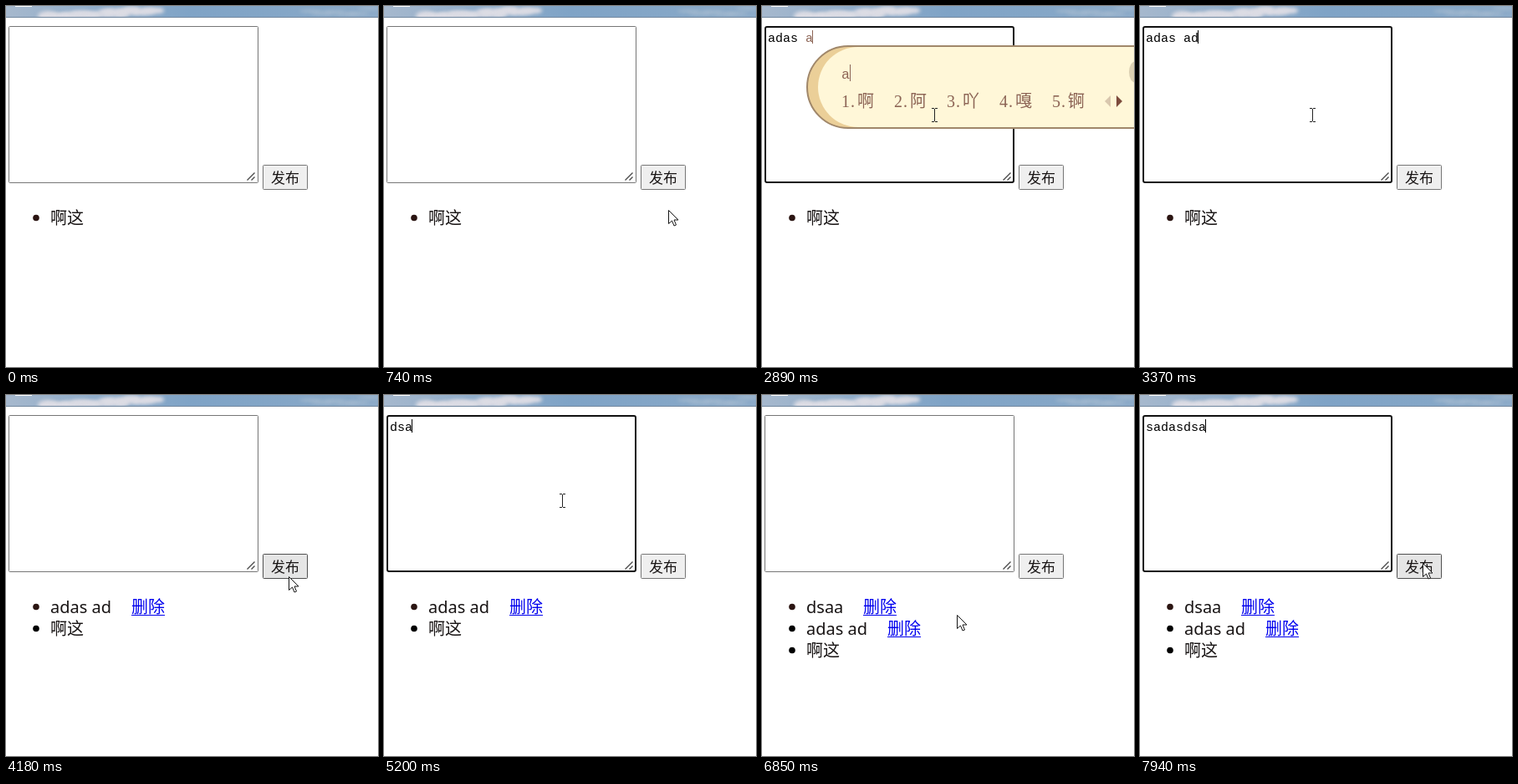
Animation of 445x432 px, one loop 8 s. Source, as an HTML page with a canvas:

```html
<!DOCTYPE html>
<html lang="zh">
<head>
<meta charset="utf-8">
<style>
html, body { margin: 0; width: 100%; height: 100%; overflow: hidden; background: #fff; }
canvas { display: block; }
</style>
</head>
<body>
<canvas id="stage" width="445" height="432"></canvas>
<script>
const ctx = document.getElementById('stage').getContext('2d');
const LOOP = 8000, STEP = 67, KEY_PACE = 200;
const CJK = '"Noto Sans CJK SC", "Noto Sans CJK", sans-serif';
const LIST_FONT = '20px "Noto Sans", "Open Sans", ' + CJK;
const CJK_FONT = '300 20px ' + CJK;
const MONO = '"Liberation Mono", monospace';
const INK = '#181414', BROWN = '#8c6455';

// Each visit to the input: focus, steady key presses, then an optional click on the button
const rounds = [
  { focus: 1210, keys: 1610, chunks: ['a', 'd', 'as', ' '], submit: 4110 },
  { focus: 4780, keys: 4800, chunks: ['d', 's', 'a', 'a'], submit: 6220 },
  { focus: 7200, keys: 7340, chunks: ['sa', 'da', 'sd', 'sa'], submit: LOOP }
];
const ime = { start: 2890, second: 2960, end: 3370 };

const home = { x: 340, y: 338 };
const moves = [
  { from: 260, to: 740, x: 340, y: 244 },
  { from: 940, to: 1280, x: 203, y: 134 },
  { from: 2230, to: 2360, x: 206, y: 130 },
  { from: 3370, to: 3640, x: 288, y: 188 },
  { from: 3840, to: 3910, x: 338, y: 217 },
  { from: 4580, to: 4780, x: 213, y: 126 },
  { from: 5470, to: 6090, x: 338, y: 221 },
  { from: 6350, to: 6850, x: 233, y: 263 },
  { from: 6920, to: 7200, x: 207, y: 130 },
  { from: 7400, to: 7810, x: 338, y: 201 }
];

const between = (t, a, b) => t >= a && t < b;
const clamp = v => Math.min(1, Math.max(0, v));
const ease = u => u * u * (3 - 2 * u);

function seeded(seed) {
  return () => (seed = seed * 16807 % 2147483647) / 2147483647;
}

function pointerAt(t) {
  if (t < moves[0].from) return null;
  let { x, y } = home;
  for (const m of moves) {
    const steps = Math.round((m.to - m.from) / STEP);
    const k = ease(Math.floor(clamp((t - m.from) / (m.to - m.from)) * steps) / steps);
    x += (m.x - x) * k;
    y += (m.y - y) * k;
  }
  return { x: Math.round(x), y: Math.round(y) };
}

function inputAt(t) {
  const round = rounds.find(r => between(t, r.focus, r.submit + STEP));
  if (!round) return { value: '', focused: false, caret: false };
  const typed = Math.max(0, Math.floor((t - round.keys) / KEY_PACE) + 1);
  let value = round.chunks.slice(0, typed).join('');
  let lastKey = typed ? round.keys + (Math.min(typed, round.chunks.length) - 1) * KEY_PACE : round.focus;
  if (round === rounds[0] && t >= ime.start) {
    value += t < ime.second ? 'a' : 'ad';
    lastKey = Math.max(ime.start, Math.min(t, ime.end));
  }
  const focused = t < round.submit;
  const caret = focused && (typed ? t - lastKey < 480 || between(t, 2230, ime.end) : t - lastKey < 330);
  return { value, focused, caret };
}

function text(str, x, y, font, color) {
  ctx.font = font;
  ctx.fillStyle = color;
  ctx.fillText(str, x, y);
}

function rect(x, y, w, h, color) {
  ctx.fillStyle = color;
  ctx.fillRect(x, y, w, h);
}

function ellipse(x, y, rx, ry, color) {
  ctx.beginPath();
  ctx.ellipse(x, y, rx, ry, 0, 0, 7);
  ctx.fillStyle = color;
  ctx.fill();
}

function polygon(points, fill, stroke) {
  ctx.beginPath();
  points.forEach(([x, y]) => ctx.lineTo(x, y));
  ctx.closePath();
  ctx.fillStyle = fill;
  ctx.fill();
  if (stroke) {
    ctx.strokeStyle = stroke;
    ctx.lineWidth = 1;
    ctx.stroke();
  }
}

function box(x, y, w, h, line, fill, stroke) {
  ctx.beginPath();
  ctx.roundRect(x + line / 2, y + line / 2, w - line, h - line, line);
  ctx.fillStyle = fill;
  ctx.fill();
  ctx.lineWidth = line;
  ctx.strokeStyle = stroke;
  ctx.stroke();
}

function drawSky() {
  const random = seeded(41);
  const sky = ctx.createLinearGradient(0, 0, 445, 0);
  ['#a6b8cd', '#8fadcb', '#7fa3c6', '#84a6c7', '#8dabc9'].forEach((c, i) => sky.addColorStop(i / 4, c));
  ctx.save();
  ctx.beginPath();
  ctx.rect(0, 0, 445, 13);
  ctx.clip();
  rect(0, 0, 445, 13, sky);
  ctx.filter = 'blur(2px)';
  for (let i = 0; i < 14; i++) {
    const y = 12 - i * .8 + random() * 4;
    ellipse(50 + i * 10, y, 8 + random() * 10, 3 + random() * 3, '#dcdce4');
  }
  for (let i = 0; i < 6; i++) ellipse(365 + i * 14, random() * 10, 14, 1.5, '#a9bdd1');
  ctx.restore();
  rect(0, 13, 445, 1, '#71879f');
  rect(11, 0, 20, 1, '#fff');
}

function drawInput({ value, focused, caret }, composing) {
  box(3, 24, 299, 188, focused ? 2 : 1, '#fff', focused ? '#101010' : '#767676');
  ctx.strokeStyle = '#4a4a4a';
  ctx.lineWidth = 1.4;
  ctx.beginPath();
  for (const size of [9, 4]) {
    ctx.moveTo(297.5 - size, 208.5);
    ctx.lineTo(297.5, 208.5 - size);
  }
  ctx.stroke();
  const font = '15px ' + MONO;
  const settled = composing ? 5 : value.length;
  text(value.slice(0, settled), 7, 43, font, '#000');
  text(value.slice(settled), 7 + settled * 9, 43, font, BROWN);
  if (caret) rect(6 + value.length * 9, 29, 1, 16, composing ? BROWN : '#000');
}

function drawButton(hover, pressed) {
  const fill = pressed ? '#f5f5f5' : hover ? '#e5e5e5' : '#efefef';
  box(307, 190, 54, 30, 1, fill, pressed ? '#8d8d8d' : hover ? '#4f4f4f' : '#767676');
  text('发布', 317, 212, '300 17px ' + CJK, INK);
}

function drawList(t) {
  const posts = ['adas ad', 'dsaa'].filter((_, i) => t >= rounds[i].submit + STEP);
  [...posts.reverse(), '啊这'].forEach((item, i) => {
    const base = 261 + i * 26;
    ellipse(36, base - 7.5, 3.8, 3.8, i ? '#000' : '#2b1512');
    const removable = i < posts.length;
    text(item, 53, base, removable ? LIST_FONT : CJK_FONT, INK);
    if (removable) {
      const x = Math.round(53 + ctx.measureText(item).width + 24);
      text('删除', x, base, CJK_FONT, '#0000ee');
      rect(x, base + 2, 40, 1, '#0000ee');
    }
  });
}

function drawCandidates(typed) {
  const single = typed === 'a';
  const words = single ? ['啊', '阿', '吖', '嘎', '锕'] : ['啊的', '阿弟', '阿德', '阿斗'];
  const pitch = 43 + words[0].length * 20;
  ctx.save();
  ctx.beginPath();
  ctx.roundRect(54, 48, 480, 98, 49);
  ctx.fillStyle = '#ebcf98';
  ctx.fill();
  ctx.strokeStyle = '#a0876a';
  ctx.lineWidth = 2;
  ctx.stroke();
  ctx.clip();
  ctx.beginPath();
  ctx.roundRect(67, 49, 480, 96, 48);
  ctx.fillStyle = '#fff7d8';
  ctx.fill();
  ellipse(447, 79, 8, 13, '#dbd0b2');
  ctx.restore();
  text(typed, 95, 87, '16.67px ' + MONO, BROWN);
  rect(95 + typed.length * 10, 70, 1, 20, BROWN);
  words.forEach((word, i) => {
    const x = 95 + i * pitch;
    const serif = '20px "Liberation Serif", serif';
    text(i + 1, x, 121, serif, BROWN);
    text('.', x + 11, 121, serif, BROWN);
    text(word, x + 19, 121, CJK_FONT, BROWN);
  });
  if (single) {
    polygon([[417, 107], [417, 121], [410, 114]], '#d9c7ae');
    polygon([[424, 107], [424, 121], [431, 114]], '#7d4b3c');
  }
}

function drawPointer({ x, y }) {
  if (between(x, 4, 302) && between(y, 25, 212)) {
    rect(x, y - 7, 1, 15, '#222');
    for (const end of [y - 8, y + 8]) {
      rect(x - 3, end, 3, 1, '#222');
      rect(x + 1, end, 3, 1, '#222');
    }
    return;
  }
  const outline = [[0, 0], [0, 16], [4, 12.5], [6.5, 18.5], [9, 17.5], [6.5, 11.5], [11.5, 11.5]];
  polygon(outline.map(([dx, dy]) => [x + dx + .5, y + dy + .5]), '#fff', '#151515');
}

function draw(t) {
  rect(0, 0, 445, 432, '#fff');
  drawSky();
  const pointer = pointerAt(t);
  const hover = pointer && between(pointer.x, 307, 361) && between(pointer.y, 190, 222);
  const composing = between(t, ime.start, ime.end);
  drawInput(inputAt(t), composing);
  drawButton(hover, rounds.some(r => between(t, r.submit, r.submit + STEP)));
  drawList(t);
  if (composing) drawCandidates(t < ime.second ? 'a' : 'ad');
  if (pointer) drawPointer(pointer);
}

const start = performance.now();
function tick() {
  draw((performance.now() - start) % LOOP);
  requestAnimationFrame(tick);
}
tick();
</script>
</body>
</html>
```
